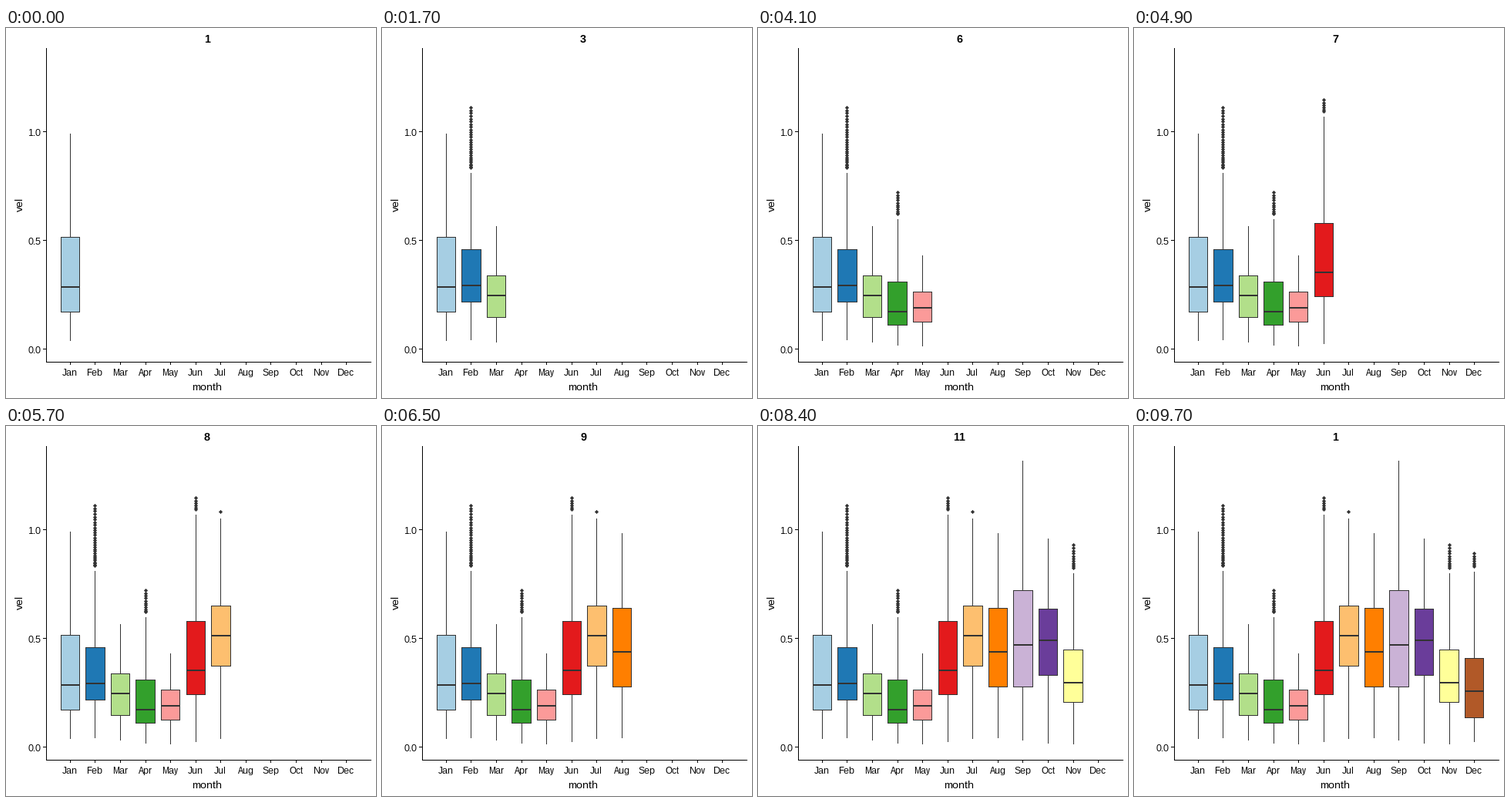
Recreate the animation shown at these times as a matplotlib script. Size 480x480 px, loop 10 s.

```python
import math

import matplotlib
import matplotlib.pyplot as plt
import numpy as np
from matplotlib.animation import FuncAnimation
from matplotlib.patches import Rectangle, RegularPolygon

matplotlib.rcParams.update({
    "font.family": "Liberation Sans",
    "text.hinting": "native",
    "text.hinting_factor": 1,
})

SIZE, DPI = 480, 100
STEP_MS, LOOP_MS = 100, 10000
INK = "#333333"
SPACING = 32.56
REACH = 1.45  # longest upper whisker, in box heights
COLORS = plt.get_cmap("Paired").colors

# Lower quartile, median, upper quartile and maximum of each month
VEL = {
    "Jan": (0.170, 0.287, 0.514, 0.989),
    "Feb": (0.216, 0.294, 0.457, 1.110),
    "Mar": (0.145, 0.248, 0.337, 0.564),
    "Apr": (0.110, 0.174, 0.309, 0.720),
    "May": (0.124, 0.191, 0.262, 0.429),
    "Jun": (0.241, 0.355, 0.578, 1.145),
    "Jul": (0.372, 0.514, 0.649, 1.082),
    "Aug": (0.277, 0.440, 0.638, 0.982),
    "Sep": (0.277, 0.472, 0.720, 1.316),
    "Oct": (0.330, 0.493, 0.635, 0.957),
    "Nov": (0.206, 0.298, 0.447, 0.929),
    "Dec": (0.135, 0.259, 0.408, 0.890),
}

# The title moves on first; the matching box follows 300 ms later
TITLE_TIMES = [min(500 + 900 * k, 900 + 800 * k) for k in range(12)]
BOX_TIMES = [0] + [t + 300 for t in TITLE_TIMES[:-1]]

fig = plt.figure(figsize=(SIZE / DPI, SIZE / DPI), dpi=DPI, facecolor="white")
ax = fig.add_axes([0, 0, 1, 1])
ax.set(xlim=(0, SIZE), ylim=(SIZE, 0))
ax.axis("off")


def column(start, i):
    return round(start + SPACING * i)


def row(vel):
    return round(416 - 282 * vel)


def block(x0, y0, x1, y1, color, z=2):
    """Fill the pixels from (x0, y0) to (x1, y1), both included."""
    return ax.add_patch(Rectangle((x0, y0), x1 - x0 + 1, y1 - y0 + 1,
                                  facecolor=color, linewidth=0, zorder=z))


def dot(x, y):
    return ax.add_patch(RegularPolygon((x + 0.5, y + 0.5), 4, radius=2.6,
                                       facecolor=INK, linewidth=0, zorder=3))


def label(x, y, text, px, **kw):
    kw = {"ha": "center", "va": "baseline", "color": "black", **kw}
    return ax.text(x, y, text, fontsize=px * 72 / DPI, **kw)


def draw_axes():
    block(52, 26, 52, 433, "black")
    block(52, 433, 473, 433, "black")
    for vel in (0.0, 0.5, 1.0):
        y = row(vel)
        block(48, y, 51, y, "black")
        label(46, y + 6, f"{vel:.1f}", 12, ha="right")
    for i, month in enumerate(VEL):
        x = column(82.93, i)
        block(x, 434, x, 436, "black")
        label(x, 451, month, 12)
    label(261, 470, "month", 14)
    label(22, 229.5, "vel", 14, rotation=90, rotation_mode="anchor")


def outlier_rows(top, fence):
    """Rows from the maximum down, closer together near the whisker."""
    gap = fence - 7 - top
    if gap < 0:
        return []
    s = np.linspace(0, 1, 1 + int(gap / 2.8))
    return np.round(top + gap * (1 - (1 - s) ** 1.3))


def draw_box(i, stats):
    q1, median, q3, top = map(row, stats)
    bottom = row(0.028 + 0.014 * math.cos(math.tau * (i - 0.75) / 6))
    fence = round(q3 - REACH * (q1 - q3))
    mid, left, right = (column(s, i) for s in (82.93, 70.78, 95.25))
    return [
        block(mid, max(top, fence), mid, bottom, INK, 3),
        block(left, q3, right, q1, INK, 4),
        block(left + 1, q3 + 1, right - 1, q1 - 1, COLORS[i], 5),
        block(left, median, right, median + 1, INK, 6),
        *(dot(mid, y) for y in outlier_rows(top, fence)),
    ]


draw_axes()
boxes = [draw_box(i, stats) for i, stats in enumerate(VEL.values())]
title = label(261, 19, "1", 14, weight="bold")


def update(frame):
    now = frame * STEP_MS
    passed = sum(now >= t for t in TITLE_TIMES)
    title.set_text(str(passed % 12 + 1))
    for parts, start in zip(boxes, BOX_TIMES):
        for part in parts:
            part.set_visible(now >= start)
    return [title]


anim = FuncAnimation(fig, update, frames=LOOP_MS // STEP_MS, interval=STEP_MS,
                     init_func=lambda: update(0), repeat=True, repeat_delay=0)
plt.show()
```
